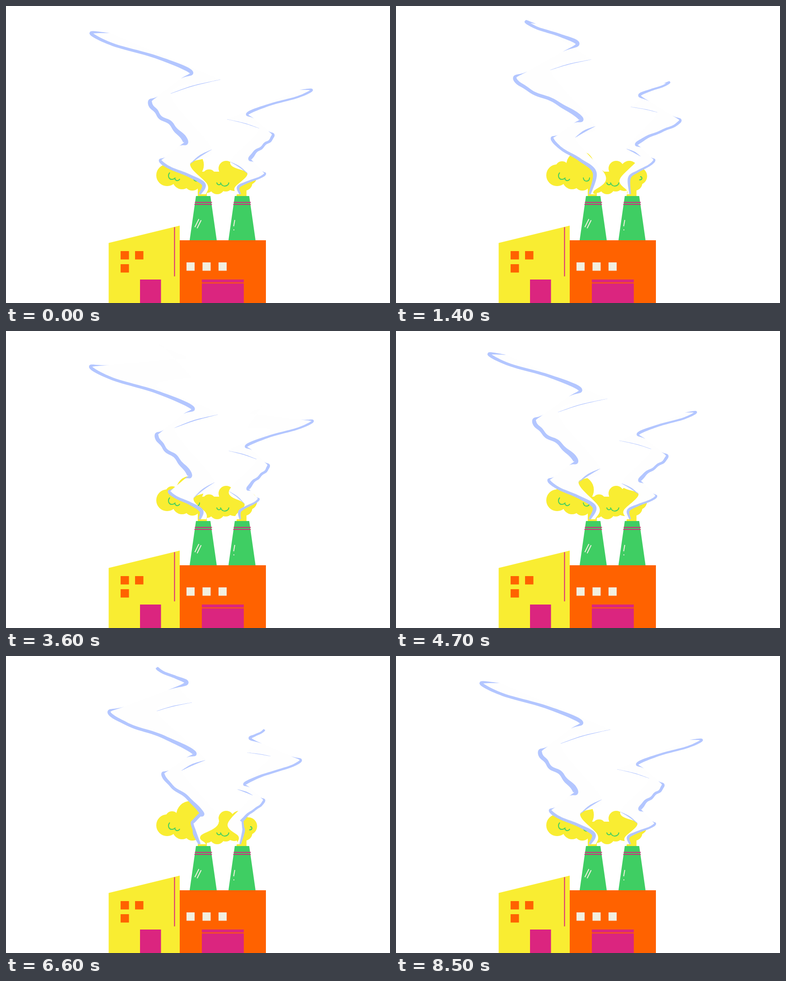
These frames come from a looping animation (851 by 658 pixels, 8530 ms). An HTML page with a canvas:

```html
<!DOCTYPE html>
<html lang="en">
<head>
<meta charset="utf-8">
<title>Factory smoke</title>
<style>
html, body { margin: 0; width: 100%; height: 100%; overflow: hidden; background: #fff; }
canvas { display: block; }
</style>
</head>
<body>
<canvas id="stage" width="851" height="658"></canvas>
<script>
const ctx = document.getElementById('stage').getContext('2d');
const YELLOW = '#f9ed32', GREEN = '#3fce63', PINK = '#db257f', ORANGE = '#ff6200',
      CREAM = '#f2efe0', BLUE = '#b3c6ff', WHITE = '#fff', SMOKE = '#fefefe';

// A new puff starts each PERIOD and rises for about three of them.
const PERIOD = 4265, STEP = 1000 / 15;
const BORN = -0.5;

// The bends of a puff each follow a path, with one point per half period of age.
const plumes = [
  { // left
    crest: [[417, 371], [342, 343], [349, 268], [319, 213], [235, 132], [188, 60], [335, 27]],
    dip: [[418, 395], [438, 395], [436, 352], [398, 300], [416, 221], [409, 145], [400, 60]],
    bulge: [[441, 415], [446, 395], [471, 364], [456, 318], [440, 238], [475, 163], [412, 103]],
    notch: [[443, 417], [443, 417], [433, 402], [408, 350], [391, 261], [365, 194], [334, 122]],
    base: [429, 417], foldBase: [443, 417], weight: 1
  },
  { // right
    crest: [[521, 362], [574, 372], [571, 324], [592, 286], [649, 236], [678, 186], [572, 164]],
    dip: [[527, 388], [515, 401], [521, 368], [541, 338], [530, 287], [536, 238], [541, 183]],
    bulge: [[511, 416], [507, 402], [492, 373], [497, 345], [514, 300], [490, 251], [535, 214]],
    notch: [[512, 417], [512, 417], [514, 402], [535, 371], [545, 313], [561, 271], [586, 222]],
    base: [519, 417], foldBase: [512, 417], weight: 0.72
  }
];

const clamp = (v, a = 0, b = 1) => Math.min(b, Math.max(a, v));
const lerp = (a, b, k, ky = k) => [a[0] + (b[0] - a[0]) * k, a[1] + (b[1] - a[1]) * ky];

// Catmull-Rom point at position x along a list of points of any dimension.
function splineAt(pts, x) {
  const last = pts.length - 1;
  x = clamp(x, 0, last);
  const i = Math.min(last - 1, Math.floor(x)), t = x - i;
  const [p, q, r, s] = [-1, 0, 1, 2].map(d => pts[clamp(i + d, 0, last)]);
  return q.map((b, c) => b + t * ((r[c] - p[c]) / 2 +
    t * (p[c] - 2.5 * b + 2 * r[c] - s[c] / 2 + t * (1.5 * (b - r[c]) + (s[c] - p[c]) / 2))));
}

function spline(pts, n = 12) {
  return Array.from({ length: (pts.length - 1) * n + 1 }, (_, i) => splineAt(pts, i / n));
}

const glide = (path, age) => splineAt(path, (age - BORN) * 2);

function fillPath(pts, color) {
  ctx.fillStyle = color;
  ctx.beginPath();
  pts.forEach(p => ctx.lineTo(p[0], p[1]));
  ctx.closePath();
  ctx.fill();
}

// Fills a band along points of [x, y, width, wobble].
function band(pts) {
  const a = [], b = [], last = pts.length - 1;
  pts.forEach(([x, y, w = 0, wobble = 0], i) => {
    const q = pts[Math.max(0, i - 1)], r = pts[Math.min(last, i + 1)];
    const dx = r[0] - q[0], dy = r[1] - q[1], d = Math.hypot(dx, dy) || 1;
    const half = Math.max(0, w) / 2, s = wobble * Math.sin(i * Math.PI / 6);
    a.push([x - dy / d * (s + half), y + dx / d * (s + half)]);
    b.unshift([x - dy / d * (s - half), y + dx / d * (s - half)]);
  });
  fillPath(a.concat(b), BLUE);
}

// Ages of the living puffs, oldest first.
const agesAt = phase => [2, 1, 0, -1].map(n => n + phase).filter(age => age >= BORN);

// Shaded edge: heavy from each crest to its dip, vanishing on the way back.
function edgeOf(pl, ages) {
  const chain = [], add = (p, w, wobble = 0) => chain.push([...p, w, wobble]);
  const neck = age => 8 * pl.weight * clamp((0.85 - age) / 0.32);
  ages.forEach((age, i) => {
    const crest = glide(pl.crest, age), dip = glide(pl.dip, age);
    const rough = clamp(1 - Math.abs(age - 1) / 0.7);
    const size = pl.weight * (0.95 + 0.35 * rough) * clamp((2.8 - age) / 0.2);
    const lowest = i === ages.length - 1;
    add(lerp(crest, glide(pl.dip, age + 1), 0.2), neck(age + 1));
    add(crest, 7 * size);
    add(lerp(crest, dip, 0.22, 0.3), 6.5 * size, 2 * rough * pl.weight);
    add(lerp(crest, dip, 0.65, 0.62), 7 * size, 2 * rough * pl.weight);
    add(dip, 9 * size);
    if (lowest) add(pl.base, 5 * pl.weight);
    else add(lerp(dip, glide(pl.crest, age - 1), 0.24), neck(age));
  });
  return spline(chain);
}

function foldOf(pl, ages) {
  const pts = ages.flatMap(age => [glide(pl.bulge, age), glide(pl.notch, age)]);
  return spline([...pts, pl.foldBase]);
}

function drawFolds(pl, ages) {
  ages.filter(age => age > 0.8 && age < 2.6).forEach(age => {
    const from = glide(pl.notch, age), to = glide(pl.bulge, age);
    const w = pl.weight * clamp(4.5 - 4 * Math.abs(age - 1.25), 1.4, 4);
    const mid = lerp(from, to, 0.45, 0.55);
    band(spline([[...from, 0.6], [...mid, w], [...to, 0.4]]));
  });
}

function rects(color, list) {
  ctx.fillStyle = color;
  list.forEach(r => ctx.fillRect(...r));
}

function lines(color, width, d) {
  ctx.strokeStyle = color;
  ctx.lineWidth = width;
  ctx.stroke(new Path2D(d));
}

function drawCloud() {
  ctx.fillStyle = YELLOW;
  [[357, 375, 24], [368, 359, 15], [408, 352, 30.5], [390, 385, 21], [413, 391, 18],
   [450, 377, 15], [445, 397, 17], [468, 400, 17], [488, 360, 17], [487, 394, 17],
   [506, 391, 19], [517, 362, 19], [537, 377, 19.5], [529, 392, 17]].forEach(([x, y, r]) => {
    ctx.beginPath();
    ctx.arc(x, y, r, 0, 7);
    ctx.fill();
  });
  rects(YELLOW, [[375, 367, 150, 30], [425, 400, 20, 21], [512, 400, 21, 21]]);
  lines(GREEN, 2,
    'M363 369C357 376 361 385 369 384Q374 383 375 380M374 381Q375 387 380 387Q384 386 385 383' +
    'M415 380Q416 388 422 388Q429 388 429 380' +
    'M467 391Q468 396 472 396Q475 396 477 392M475 391Q478 399 485 399Q493 398 494 391' +
    'M541 378Q545 378 545 382Q544 386 539 385');
}

function drawChimney(x) {
  rects(YELLOW, [[x + 4, 417.5, 20, 4]]);
  fillPath([[x, 421], [x + 32, 421], [x + 46, 519], [x - 14, 519]], GREEN);
  lines(PINK, 2, `M${x - 2.5} 435h38M${x - 3.5} 439.5h39`);
}

function drawFactory() {
  drawChimney(421);
  drawChimney(507);
  lines(CREAM, 2, 'M427.500 472L418.500 490M432.500 474.500L423.500 492.500M507 474L504.500 488');
  rects(CREAM, [[504, 495, 2, 2]]);
  fillPath([[227.5, 525], [385, 486.5], [385, 658], [227.5, 658]], YELLOW);
  rects(ORANGE, [[385, 519, 191, 139], [254, 543, 18.5, 18.5], [286, 543, 18.5, 18.5],
                 [254, 572, 18.5, 18.5]]);
  rects(PINK, [[372.5, 490, 2, 109], [297, 606, 46.5, 52], [434, 606, 93, 52]]);
  rects(ORANGE, [[434, 612.5, 93, 2]]);
  rects(CREAM, [0, 1, 2].map(i => [400 + 35.5 * i, 568, 18, 18.5]));
}

// Drawn at 15 poses a second, with a short rest where the cycle closes.
function phaseAt(ms) {
  const p = ms % PERIOD;
  if (p < 100 || p >= 4195) return 0;
  return Math.floor((p + 5) / STEP) * STEP / PERIOD;
}

function draw(ms) {
  const ages = agesAt(phaseAt(ms));
  rects(WHITE, [[0, 0, 851, 658]]);
  drawCloud();
  const edges = plumes.map(pl => edgeOf(pl, ages));
  plumes.forEach((pl, i) => fillPath([...edges[i], ...foldOf(pl, ages).reverse()], SMOKE));
  edges.forEach(band);
  plumes.forEach(pl => drawFolds(pl, ages));
  drawFactory();
}

const start = performance.now();
function tick() {
  draw(performance.now() - start);
  requestAnimationFrame(tick);
}
tick();
</script>
</body>
</html>
```
